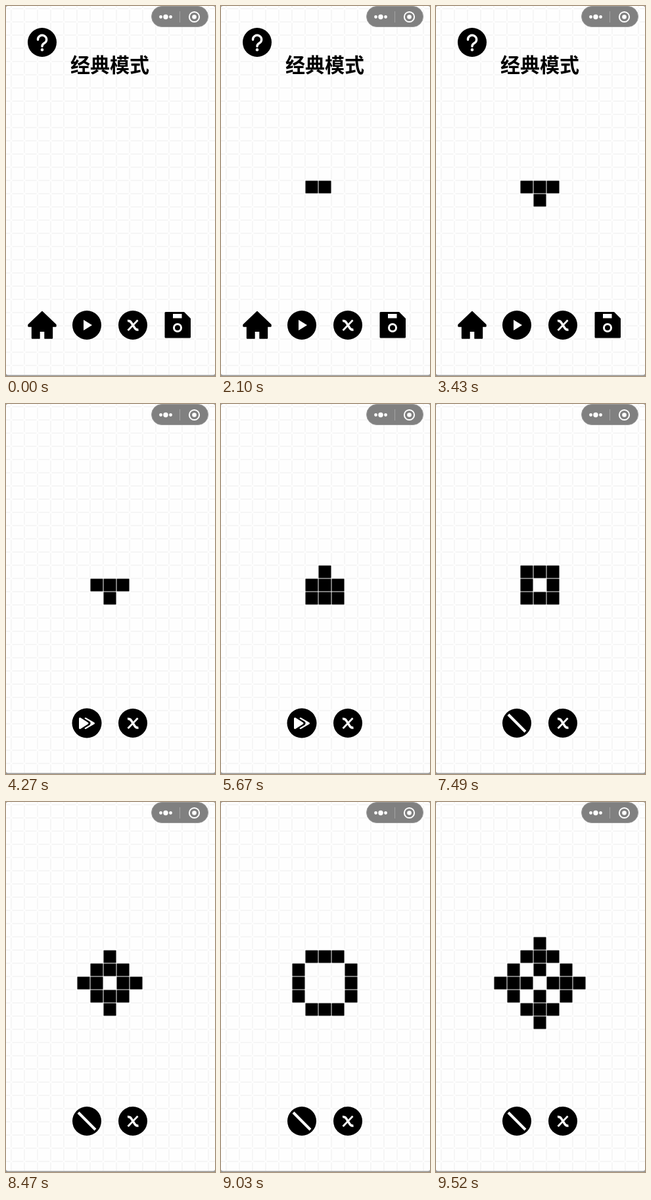
Write an HTML page that moves like this. It is 318x560 px and loops after 9870 ms.

```html
<!DOCTYPE html>
<html lang="zh">
<head>
<meta charset="utf-8">
<title>经典模式</title>
<style>
  html, body { margin: 0; height: 100%; overflow: hidden; background: #fff; }
  svg { display: block; }
  .line { fill: none; stroke: #fff; }
  .light { fill: #fff; }
</style>
</head>
<body>
<svg width="318" height="560" viewBox="0 0 318 560">
  <rect width="318" height="560" fill="#999"/>
  <rect width="318" height="558.5" rx="3" fill="#fefefe"/>
  <path id="grid" fill="none" stroke="#ededed" stroke-dasharray="17 3" stroke-dashoffset="-1.5"/>

  <rect x="221.5" y="0.5" width="86" height="31" rx="15.5" fill="#808080" stroke="#9a9a9a"/>
  <path d="M264.5 8v17" stroke="#a2a2a2"/>
  <g class="light">
    <circle cx="235.5" cy="16.5" r="2.4"/>
    <circle cx="243" cy="16.5" r="3.7"/>
    <circle cx="250.5" cy="16.5" r="2.4"/>
    <circle cx="286.5" cy="16.5" r="3.3"/>
  </g>
  <circle class="line" cx="286.5" cy="16.5" r="7.6" stroke-width="2"/>

  <path id="cells"/>

  <g id="editor">
    <circle cx="55" cy="55" r="22"/>
    <path class="line" d="M48.5 51a6.6 6.3 0 1 1 10.4 4.8q-3.9 2.3 -3.9 5.2" stroke-width="3.4" stroke-linecap="round"/>
    <circle class="light" cx="55" cy="66.3" r="2.2"/>
    <text x="98" y="100" font-size="30" font-weight="700" font-family="'Noto Sans CJK SC', 'Noto Sans CJK', sans-serif">经典模式</text>
    <path d="M55 463L34.5 482.5V484.5H40V502.5H51V492.5H59V502.5H70V484.5H75.5V482.5Z" stroke="#000" stroke-width="2.4" stroke-linejoin="round"/>
    <path class="light" d="M51.7 493h6.6v11h-6.6z"/>
    <circle cx="123" cy="483" r="22"/>
    <path class="light" d="M118 475L131 483L118 491Z"/>
    <path d="M243 463H271L281 473V501Q281 502.500 279.500 502.500H243Q241.500 502.500 241.500 501V464.500Q241.500 463 243 463Z"/>
    <path class="light" d="M254 466h13.500v6.500h-13.500z"/>
    <circle class="line" cx="261" cy="487" r="5.500" stroke-width="3"/>
  </g>

  <g id="forward">
    <circle cx="123" cy="483" r="22.5"/>
    <g stroke-linejoin="round">
      <path class="light" d="M121 476L133.500 483.200L121 490.500Z" stroke="#fff" stroke-width="3"/>
      <path d="M112.500 476L125 483.200L112.500 490.500Z" stroke="#000" stroke-width="7"/>
      <path class="light" d="M112.500 476L124 483.200L112.500 490.500Z" stroke="#fff" stroke-width="3"/>
    </g>
  </g>

  <g id="fastest">
    <circle cx="123" cy="483" r="22"/>
    <path class="line" d="M110 470L136 496" stroke-width="4"/>
  </g>

  <circle cx="193" cy="483" r="22"/>
  <path class="line" d="M185 476.500Q188.500 476 190.500 479L196 487.500Q198 490.500 201.500 490" stroke-width="3.4"/>
  <path class="line" d="M200.500 475.500L185.500 491" stroke-width="2.8"/>
</svg>
<script>
const LOOP = 9870, EDIT_END = 4270, FASTEST = 6230;
const seed = [[-1, 0], [0, 0], [1, 0], [0, 1]];
const placedAt = [1540, 2100, 2660, 3430];
const stepAt = [5670, 6300, 6860, 7490, 7980, 8470, 9030, 9520];
const el = id => document.getElementById(id);

// Conway's Life on a small board around the centre cell
function evolve(cells) {
  const alive = new Set(cells.map(String)), next = [];
  for (let y = -5; y <= 5; y++) {
    for (let x = -5; x <= 5; x++) {
      const near = cells.filter(([a, b]) => Math.max(Math.abs(a - x), Math.abs(b - y)) === 1).length;
      if (near === 3 || (near === 2 && alive.has(`${x},${y}`))) next.push([x, y]);
    }
  }
  return next;
}

const generations = [seed];
stepAt.forEach(() => generations.push(evolve(generations.at(-1))));

let grid = '';
for (let x = 8; x < 318; x += 20) grid += `M${x} -16V558`;
for (let y = 4; y < 558; y += 20) grid += `M-12 ${y}H318`;
el('grid').setAttribute('d', grid);

const passed = (times, t) => times.filter(at => t >= at).length;
const show = (id, on) => el(id).setAttribute('visibility', on ? 'visible' : 'hidden');
const square = ([x, y]) => `M${148.5 + 20 * x} ${264.5 + 20 * y}h19v19h-19z`;

function draw() {
  const t = performance.now() % LOOP;
  const cells = t < EDIT_END ? seed.slice(0, passed(placedAt, t)) : generations[passed(stepAt, t)];
  el('cells').setAttribute('d', cells.map(square).join(''));
  show('editor', t < EDIT_END);
  show('forward', t >= EDIT_END && t < FASTEST);
  show('fastest', t >= FASTEST);
  requestAnimationFrame(draw);
}
draw();
</script>
</body>
</html>
```
